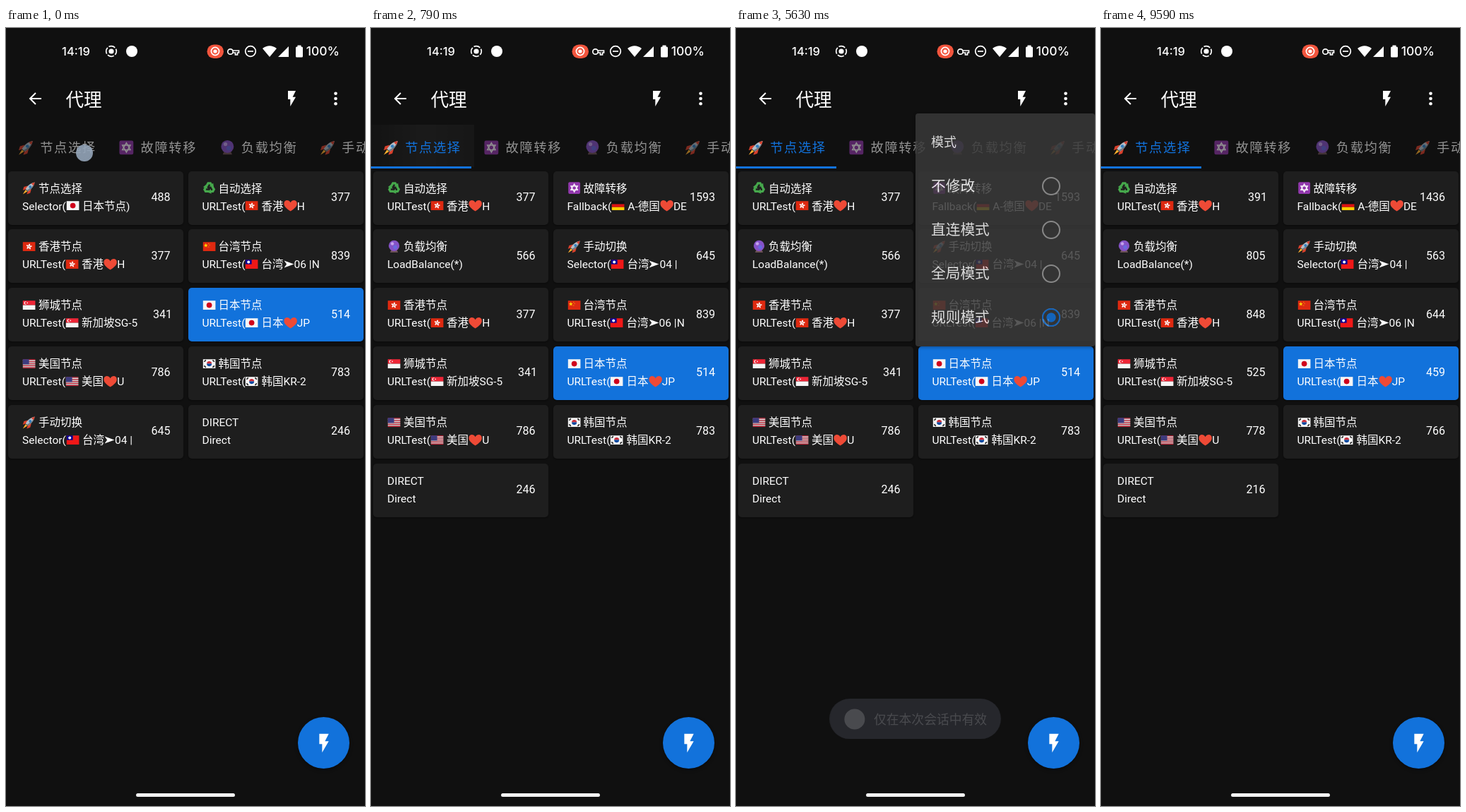
Animation of 508 by 1102 pixels, one loop 9760 ms. Source, as an HTML page:

```html
<!DOCTYPE html>
<html lang="zh">
<head>
<meta charset="utf-8">
<title>代理</title>
<style>
  html, body { margin: 0; width: 100%; height: 100%; overflow: hidden; background: #101010; }
  body { color: #fff; font: 15.5px Roboto, "Noto Sans CJK SC", "Noto Sans CJK", sans-serif; }
  #stage { position: relative; width: 508px; height: 1102px; overflow: hidden; background: #101010; }
  #stage div, #chrome, #spinner { position: absolute; white-space: nowrap; }
  #chrome { inset: 0; }
  .icon { width: 1.24em; height: 1.24em; vertical-align: -.27em; }
  .icon.arrow { width: .97em; }

  #title { left: 84.5px; top: 82px; font-size: 25.6px; line-height: 40px; }
  .tab { top: 154.5px; font-size: 18.3px; line-height: 30px; letter-spacing: 1.6px; opacity: .54; }
  .tab .icon { margin-right: 2.4px; }
  #press { left: 0; top: 137px; width: 146px; height: 60px; background: linear-gradient(90deg, #fff1, #fff3 50%, #fff2); }
  #bar { left: 0; top: 196px; width: 142px; height: 3px; background: #1272db; }

  #pages { left: 0; top: 199px; width: 508px; height: 903px; overflow: hidden; }
  #strip, .page { top: 0; width: 508px; height: 903px; }
  .card { width: 248px; height: 76px; border-radius: 5px; background: #1e1e1e; box-shadow: 0 1px 2px #0006; }
  .card.on { background: #1272db; }
  .card .name, .card .sub { left: 20px; line-height: 24px; }
  .card .name { top: 13px; }
  .card .sub { top: 38px; }
  .card .ms { right: 18.5px; top: 25.5px; font-size: 16px; line-height: 24px; }

  #fab { left: 413px; top: 975.5px; width: 73px; height: 73px; border-radius: 50%; background: #1272db; box-shadow: 0 2px 5px #0006; }
  #fab svg { position: absolute; left: 20.5px; top: 20.5px; width: 32px; height: 32px; }

  .menu { left: 254px; top: 121px; width: 254px; border-radius: 4px; background: #393939; box-shadow: 0 1px 5px #0006; font-size: 20.7px; }
  #main { height: 268px; }
  #sub { height: 330px; }
  .menu .row { left: 0; width: 254px; height: 62px; line-height: 62px; text-indent: 22px; }
  .menu .head { font-size: 18px; }
  .row i { position: absolute; left: 215px; top: 25px; border: solid transparent; border-width: 6px 0 6px 7px; border-left-color: #fff; }
  .row .radio { left: 179px; top: 18px; width: 26px; height: 26px; box-sizing: border-box; border: 2px solid #9c9c9c; border-radius: 50%; }
  .row .picked { border-color: #1272db; background: radial-gradient(circle, #1272db 6.2px, #393939 7px); }
  #glow { left: 0; top: 72px; width: 254px; height: 62px; background: #fff2; }
  #ripple { left: 449px; top: 76px; width: 44px; height: 44px; border-radius: 50%; background: #fff; }

  #toast { left: 128px; top: 949px; width: 251px; height: 59px; border-radius: 30px; font-size: 18.4px; line-height: 59px; }
  #note { inset: 0; }
  #note span { position: absolute; left: 65px; top: 1px; }
  #note i { position: absolute; left: 21.5px; top: 14.5px; width: 30px; height: 30px; border-radius: 50%; background: #fff; }
  #home { left: 184px; top: 1084px; width: 140px; height: 4.5px; border-radius: 3px; background: #f2f2f2; }
  #dot { left: 0; top: 0; width: 24px; height: 24px; margin: -12px; border-radius: 50%;
    background: radial-gradient(circle, #94a5b9e6 70%, #b3bfcde6); }
  #spinner { left: 388px; top: 84px; width: 32px; height: 32px; }
</style>
</head>
<body>
<div id="stage">
  <div id="pages"><div id="strip"></div></div>
  <div id="press"></div>
  <svg id="chrome" width="508" height="1102" viewBox="0 0 508 1102" fill="#fff">
    <g font-family="Inter, Roboto, sans-serif" font-weight="500">
      <text x="99" y="39" font-size="16.5" text-anchor="middle">14:19</text>
      <text x="472" y="39.3" font-size="17.5" text-anchor="end">100%</text>
    </g>
    <circle cx="149" cy="33" r="3.6"/>
    <circle cx="149" cy="33" r="7.3" fill="none" stroke="#fff" stroke-width="1.7" stroke-dasharray="9.5 2" stroke-dashoffset="4"/>
    <circle cx="178" cy="33" r="8"/>
    <rect x="284.5" y="23.5" width="23.5" height="19.5" rx="9.7" fill="#f2553d"/>
    <circle cx="296" cy="33" r="2.6"/>
    <g fill="none" stroke="#fff" stroke-width="1.7">
      <circle cx="296" cy="33" r="5.6"/>
      <circle cx="317.5" cy="33.5" r="3.7"/>
      <path d="M321 32h8.5v3h-2v3h-3v-3h-3.5"/>
      <circle cx="346" cy="33" r="7.3"/>
      <path d="M342 33h8"/>
      <path d="M50 100H34M42 92l-8 8 8 8" stroke-width="2"/>
    </g>
    <path d="M363 29Q373 21.5 383 29L373 41ZM385 41L400 26V41Z"/>
    <rect x="410" y="26.5" width="10" height="15" rx="1.5"/>
    <rect x="412.5" y="24.5" width="5" height="3"/>
    <path id="bolt" d="M399 89v12h3.3v10l7.7-13.2h-4.4l4.4-8.8z"/>
    <circle cx="466.5" cy="92.7" r="2.3"/>
    <circle cx="466.5" cy="100" r="2.3"/>
    <circle cx="466.5" cy="107.3" r="2.3"/>
  </svg>
  <svg id="spinner" viewBox="0 0 32 32"><circle id="arc" cx="16" cy="16" r="13.5" pathLength="100" fill="none" stroke="#1272db" stroke-width="3"/></svg>
  <div id="title">代理</div>
  <div id="tabs"></div>
  <div id="bar"></div>
  <div id="fab"><svg viewBox="0 0 24 24"><path d="M7 2v11h3v9l7-12h-4l4-8z" fill="#fff"/></svg></div>
  <div id="ripple"></div>
  <div id="main" class="menu"><div id="glow"></div></div>
  <div id="sub" class="menu"></div>
  <div id="toast"><div id="note"><i></i><span>仅在本次会话中有效</span></div></div>
  <div id="home"></div>
  <div id="dot"></div>
</div>
<script>
const LOOP = 9760;
const $ = id => document.getElementById(id);
const add = (parent, html) => parent.insertAdjacentHTML('beforeend', html);

// Small pictograms on a 24 x 24 grid
const box = (fill, x = 1, y = 4, w = 22, h = 16) => `<rect x="${x}" y="${y}" width="${w}" height="${h}" fill="${fill}"/>`;
const disc = (fill, x, y, r) => `<circle cx="${x}" cy="${y}" r="${r}" fill="${fill}"/>`;
const shape = (fill, d) => `<path d="${d}" fill="${fill}"/>`;
const bands = (...colors) => colors.map((c, i) => box(c, 1, 4 + i * 16 / colors.length, 22, 16 / colors.length)).join('');
const spin = (n, body) => Array.from({ length: n }, (_, i) => `<g transform="rotate(${i * 360 / n} 12 12)">${body}</g>`).join('');

const art = {
  hk: box('#de2910') + spin(5, '<ellipse cx="12.6" cy="9.2" rx="1.3" ry="2.4" fill="#fff"/>'),
  cn: box('#de2910') + shape('#ffde00', 'M6 6l1 2.6h2.7l-2.2 1.7.8 2.7L6 11.4 3.700 13l.8-2.7-2.200-1.700H5z')
    + disc('#ffde00', 11, 6.5, .7) + disc('#ffde00', 12.6, 9, .7) + disc('#ffde00', 11, 12.5, .7),
  tw: box('#f01818') + box('#000095', 1, 4, 11, 8) + disc('#fff', 6.5, 8, 2.5),
  jp: box('#f5f5f5') + disc('#d0021b', 12, 12, 4.8),
  kr: box('#f5f5f5') + shape('#cd2e3a', 'M7.6 12a4.4 4.4 0 0 1 8.8 0z') + shape('#0047a0', 'M7.6 12a4.4 4.4 0 0 0 8.8 0z')
    + '<path d="M3 8.5l3-3M18 5.5l3 3M3 15.5l3 3M18 18.5l3-3" stroke="#222" stroke-width="2"/>',
  sg: bands('#ee2536', '#f5f5f5') + disc('#fff', 6, 8, 2.8) + disc('#ee2536', 7.3, 8, 2.5) + disc('#fff', 9, 8, 1),
  us: bands('#c8283c', '#eee', '#c8283c', '#eee', '#c8283c', '#eee', '#c8283c', '#eee', '#c8283c') + box('#3c3b7e', 1, 4, 11, 9),
  de: bands('#111', '#dd1111', '#ffce00'),
  ru: bands('#f5f5f5', '#0039a6', '#d52b1e'),
  id: bands('#e3202b', '#f5f5f5'),
  heart: shape('#ee4a36', 'M12 22C5 17 .5 13.5.5 8.300.5 1.500 9 .5 12 6.500 15 .5 23.500 1.500 23.500 8.300 23.500 13.500 19 17 12 22z'),
  arrow: shape('#fff', 'M1 4l22 8-22 8 5.5-8z'),
  rocket: shape('#ffb02e', 'M6 15l-5 8 8-5z') + shape('#d8402c', 'M10 8L3 10l-2 6 6-2zM16 14l-2 7-6 2 2-6z')
    + shape('#b4bec8', 'M22 2C16 3 10 7 6 14l4 4C17 14 21 8 22 2z') + shape('#6d7882', 'M22 2C20 8 15 13 8 16l2 2C17 14 21 8 22 2z')
    + shape('#d8402c', 'M22 2l-6 2 4 4z') + disc('#2f7fc0', 14, 10, 2.4),
  star: '<rect x="1.5" y="1.5" width="21" height="21" rx="2.5" fill="#9238ad"/>'
    + '<path d="M12 5l6 10.5H6zM12 19L6 8.5h12z" fill="none" stroke="#fff" stroke-width="1.5"/>',
  ball: shape('#6e5258', 'M5 22.500l2.500-6h9l2.500 6z') + disc('#8552c8', 12, 10.5, 9.5) + disc('#c3a2ee', 9, 7, 2.8) + disc('#6a68e0', 14, 13, 3.5),
  recycle: spin(3, '<path d="M7 9L10 3.500h4l2.200 3.600" fill="none" stroke="#46a84c" stroke-width="4"/><path d="M12 9l8 1.500-1-7z" fill="#46a84c"/>')
};
const rich = s => s.replace(/:(\w+):/g, (_, n) => `<svg class="icon ${n}" viewBox="0 0 24 24">${art[n]}</svg>`);

// Proxy groups: name, detail, delay, delay after the test
const auto = [':recycle: 自动选择', 'URLTest(:hk: 香港:heart:H', 377, 391];
const fail = [':star: 故障转移', 'Fallback(:de: A-德国:heart:DE', 1593, 1436];
const load = [':ball: 负载均衡', 'LoadBalance(*)', 566, 805];
const manual = [':rocket: 手动切换', 'Selector(:tw: 台湾:arrow:04 |', 645, 563];
const regions = [
  [':hk: 香港节点', 'URLTest(:hk: 香港:heart:H', 377, 848],
  [':cn: 台湾节点', 'URLTest(:tw: 台湾:arrow:06 |N', 839, 644],
  [':sg: 狮城节点', 'URLTest(:sg: 新加坡SG-5', 341, 525],
  [':jp: 日本节点', 'URLTest(:jp: 日本:heart:JP', 514, 459],
  [':us: 美国节点', 'URLTest(:us: 美国:heart:U', 786, 778],
  [':kr: 韩国节点', 'URLTest(:kr: 韩国KR-2', 783, 766]
];
const direct = ['DIRECT', 'Direct', 246, 216];
const nodes = [
  ':de: A-德国:heart:DE', ':de: B-德国:heart:DE', ':ru: 俄罗斯:heart:RU', ':us: 美国:heart:US', ':id: 印尼:heart:ID', ':kr: 韩国KR-2',
  ...Array.from({ length: 8 }, (_, i) => `:tw: 台湾:arrow:0${i + 1} |N`),
  ':sg: 新加坡SG-4', ':sg: 新加坡SG-5', ':sg: 新加坡:heart:SG', ':sg: 新加坡:heart:SG',
  ...Array(4).fill(':jp: 日本:heart:JP')
].map((name, i) => [name, 'Shadowsocks', 300 + i * 137 % 600]);

const delay = (ms, kind) => `<div class="ms ${kind}"${ms % 10 === 1 ? ' style="margin-right:-2.5px"' : ''}>${ms}</div>`;
const card = ([name, sub, before, after], i, on) =>
  `<div class="card${on ? ' on' : ''}" style="left:${3 + i % 2 * 254.5}px;top:${3.5 + (i >> 1) * 82.8}px">
    <div class="name">${rich(name)}</div><div class="sub">${rich(sub)}</div>
    ${delay(before, 'before') + (after ? delay(after, 'after') : '')}</div>`;
const page = (list, on, index, id) =>
  `<div class="page" id="${id}" style="left:${index * 508}px">${list.map((item, i) => card(item, i, i === on)).join('')}</div>`;

add($('strip'), page([auto, fail, load, manual, ...regions, direct], 7, 0, 'first')
  + page(nodes, 0, 1, 'second') + page(nodes, -1, 2, 'third') + page(nodes, 9, 3, 'fourth'));
add($('pages'), page([[':rocket: 节点选择', 'Selector(:jp: 日本节点)', 488], auto, ...regions, manual, direct], 5, 0, 'last'));

add($('tabs'), [':rocket: 节点选择', ':star: 故障转移', ':ball: 负载均衡', ':rocket: 手动切换'].map((name, i) =>
  `<div class="tab" id="tab${i}" style="left:${17 + i * 142.3}px">${rich(name)}</div>`).join(''));

const row = (text, i, extra = '', kind = '') => `<div class="row ${kind}" style="top:${10 + i * 62}px">${text}${extra}</div>`;
add($('main'), ['过滤', '模式', '布局', '排序'].map((s, i) => row(s, i, '<i></i>')).join(''));
add($('sub'), row('模式', 0, '', 'head') + ['不修改', '直连模式', '全局模式', '规则模式'].map((s, i) =>
  row(s, i + 1, '<div class="radio"></div>' + (i % 3 ? '' : `<div class="radio picked" id="pick${i}"></div>`))).join(''));

// Keyframes in ms; a value holds until the next one unless an easing is given
let css = '', count = 0;
function keys(selector, frames) {
  const name = 'k' + count++;
  const line = (pct, body, ease = 'step-end') => `${pct}%{${body};animation-timing-function:${ease}}`;
  const last = frames[frames.length - 1][1];
  css += `@keyframes ${name}{${frames.map(([t, body, ease]) => line((t / LOOP * 100).toFixed(4), body, ease)).join('')}${line(100, last)}}
    ${selector}{animation:${name} ${LOOP}ms infinite}\n`;
}
const see = v => 'opacity:' + v;
const move = (x, y) => `transform:translate(${x}px,${y}px)`;

const JUMP = 90, DONE = 9390;
keys('#last', [[0, see(1)], [JUMP, see(0)]]);
keys('#strip', [
  [0, move(-1524, 0) + ';opacity:0'], [JUMP, move(-1524, 0) + ';opacity:1', 'linear'],
  [228, move(-508, 0) + ';opacity:1', 'cubic-bezier(.333,.667,.667,1)'], [418, move(0, 0) + ';opacity:1']]);
keys('#tab0', [[0, 'color:#fff;opacity:.54'], [150, 'color:#1272db;opacity:1']]);
keys('#bar', [[0, move(508, 0)], [JUMP, move(508, 0), 'ease-out'], [320, move(0, 0)]]);
keys('#press', [[0, see(0)], [50, see(0), 'linear'], [200, see(1)], [420, see(1), 'linear'], [900, see(0)]]);

const shown = 'transform:scale(1);opacity:1', gone = 'transform:scale(.3);opacity:0';
keys('#fab', [
  [0, shown], [80, shown, 'ease-in'], [170, gone], [460, gone, 'ease-out'], [700, shown],
  [7620, shown, 'ease-in'], [7720, gone], [DONE, gone, 'ease-out'], [9580, shown]]);

const tap = (x, y, from, to) => [[from, move(x, y) + ';opacity:1'], [to, move(x, y) + ';opacity:0']];
keys('#dot', [
  ...tap(111, 177, 0, 100), ...tap(470, 98, 1920, 2050), ...tap(400, 226, 2720, 2820),
  ...tap(411, 411, 5090, 5420), ...tap(451, 1011, 7470, 7590)]);
keys('#ripple', [[0, see(0)], [1920, see(0), 'ease-out'], [2040, see(.17)], [2170, see(.17), 'linear'], [2500, see(0)]]);
keys('#glow', [[0, see(0)], [2720, see(0), 'linear'], [2800, see(1)]]);

// Popups grow out of the overflow button
function popup(selector, start, rise, inset, fade, end) {
  const pose = (x, y, clip, alpha) => `${move(x, y)};clip-path:inset(${clip});opacity:${alpha}`;
  const open = pose(0, 0, '-12px -12px', 1);
  const shut = pose(85, -rise, `${inset * 2}px 127px`, 0);
  keys(selector, [
    [0, shut], [start, shut, 'linear'],
    [start + 90, pose(17.5, -rise * .306, `${inset / 2}px 22px`, 1), 'ease-out'],
    [start + 260, open], [fade, open, 'linear'], [end, pose(0, 0, '-12px -12px', 0)]]);
}
popup('#main', 2080, 155, 67, 2820, 2920);
popup('#sub', 2960, 186, 82.5, 5600, 5800);
keys('#pick0', [[0, see(1)], [5420, see(0)]]);
keys('#pick3', [[0, see(0)], [5420, see(1)]]);

const pill = (scale, alpha) => `transform:scale(${scale});background-color:rgba(46,47,54,${alpha})`;
keys('#toast', [
  [0, pill(.93, 0)], [5560, pill(.93, 0), 'linear'], [5630, pill(.967, .75), 'ease-out'], [5780, pill(1, 1)],
  [7470, pill(1, 1), 'linear'], [7600, pill(.95, 0)]]);
keys('#note', [
  [0, see(0)], [5590, see(0), 'linear'], [5630, see(.16), 'linear'], [5780, see(1)], [7470, see(1), 'linear'], [7580, see(0)]]);

keys('#bolt', [[0, see(1)], [7620, see(0)], [DONE, see(1)]]);
const turn = (deg, alpha) => `transform:rotate(${deg}deg);opacity:${alpha}`;
keys('#spinner', [[0, turn(-90, 0)], [7620, turn(-90, 1), 'linear'], [DONE - 1, turn(400, 1)], [DONE, turn(400, 0)]]);
const arc = (len, off) => `stroke-dasharray:${len} ${100 - len};stroke-dashoffset:${-off}`;
keys('#arc', [
  [0, arc(3, 0)], [7620, arc(3, 0), 'ease-in-out'], [8290, arc(75, 0), 'ease-in-out'],
  [8950, arc(3, 72), 'ease-in-out'], [DONE, arc(50, 72)]]);
keys('#first .before', [[0, see(1)], [DONE, see(0)]]);
keys('#first .after', [[0, see(0)], [DONE, see(1)]]);
css += '#last .after{display:none}';

const style = document.createElement('style');
style.textContent = css;
document.head.append(style);
</script>
</body>
</html>
```
